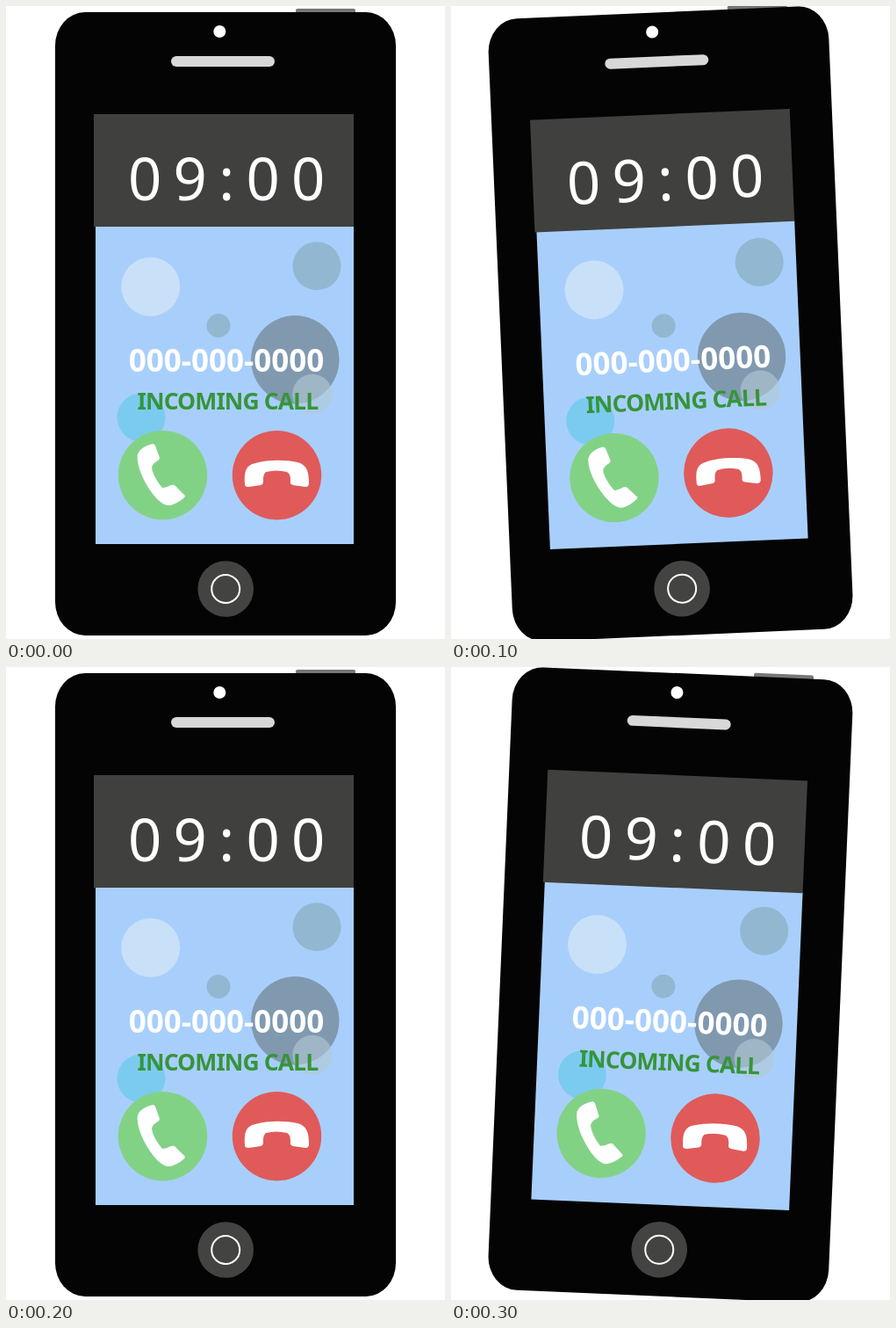
Recreate the animation shown at these times as an HTML page. Size 500 by 720 pixels, loop 0.4 s.

```html
<!DOCTYPE html>
<html lang="en">
<head>
<meta charset="utf-8">
<title>Incoming call</title>
<style>
  html, body { margin: 0; width: 100%; height: 100%; overflow: hidden; background: #fff; }
  svg { display: block; width: 100vw; height: 100vh; }
  text { font-family: "Noto Sans", "Open Sans", sans-serif; }
</style>
</head>
<body>
<svg viewBox="0 0 500 720">
  <g id="phone">
    <rect x="330" y="3" width="68" height="8" rx="2" fill="#777"/>
    <rect x="56" y="7" width="388" height="709" rx="34" ry="38" fill="#040404"/>
    <circle cx="243.3" cy="29" r="7" fill="#fff"/>
    <rect x="188" y="57" width="118" height="12" rx="6" fill="#d8d8d7"/>

    <rect x="102" y="250" width="294" height="362" fill="#a8cffb"/>
    <rect x="100" y="123" width="296" height="128" fill="#40403e"/>
    <text x="138.9" y="221" font-size="67" letter-spacing="13.3" fill="#fff">09:00</text>

    <circle cx="164.7" cy="319.2" r="33.5" fill="#c9e0f9"/>
    <circle cx="354" cy="295.7" r="27.5" fill="#92b7d0"/>
    <circle cx="242" cy="363.5" r="13.5" fill="#92b7d0"/>
    <circle cx="329.3" cy="402.3" r="50.2" fill="#8099af"/>
    <circle cx="349" cy="441.5" r="22.8" fill="#b2cad6" opacity=".6"/>
    <circle cx="154" cy="468" r="27.5" fill="#7bcbf0"/>

    <text x="251" y="415.5" font-size="35" font-weight="700" text-anchor="middle" fill="#fff">000-000-0000</text>
    <text x="149.6" y="459" font-size="26.5" font-weight="700" letter-spacing="-.9" fill="#37943a">INCOMING CALL</text>

    <circle cx="178.5" cy="533.7" r="50.7" fill="#82d286"/>
    <path fill="#fff" d="M153 505Q158 500 167 498Q169 498 170 500L175 514Q175 516 173 517Q167 520 166 525C167 533 173 542 178 548Q182 548 188 545Q190 544 192 545L203 556Q205 558 202 560Q195 566 187 568C180 569 172 562 165 552C155 538 148 520 150 510Q151 507 153 505Z"/>
    <circle cx="308.5" cy="533.7" r="50.7" fill="#e05a5a"/>
    <path fill="#fff" d="M272 544C271 530 273 522 284 520C298 516 318 516 332 519C343 522 345 530 345 543Q345 547 341 547L327 545Q323 544 324 540C324 534 323 532 320 530Q308 527 296 530C293 533 293 536 293 541Q293 544 290 545L276 547Q272 547 272 544Z"/>

    <circle cx="250.2" cy="663" r="31.8" fill="#434342"/>
    <circle cx="250.2" cy="663" r="16" fill="none" stroke="#fff" stroke-width="2"/>
  </g>
</svg>
<script>
  const phone = document.getElementById('phone');
  const STEP = 100, TILT = 2.45;
  const swing = [0, -1, 0, 1];
  const start = performance.now();

  // The phone snaps between poses, pivoting on the stage centre.
  function render(t) {
    const pose = swing[Math.floor(t / STEP) % swing.length];
    phone.setAttribute('transform', `rotate(${pose * TILT} 250 360)`);
  }

  function tick() {
    render(performance.now() - start);
    requestAnimationFrame(tick);
  }
  tick();
</script>
</body>
</html>
```
